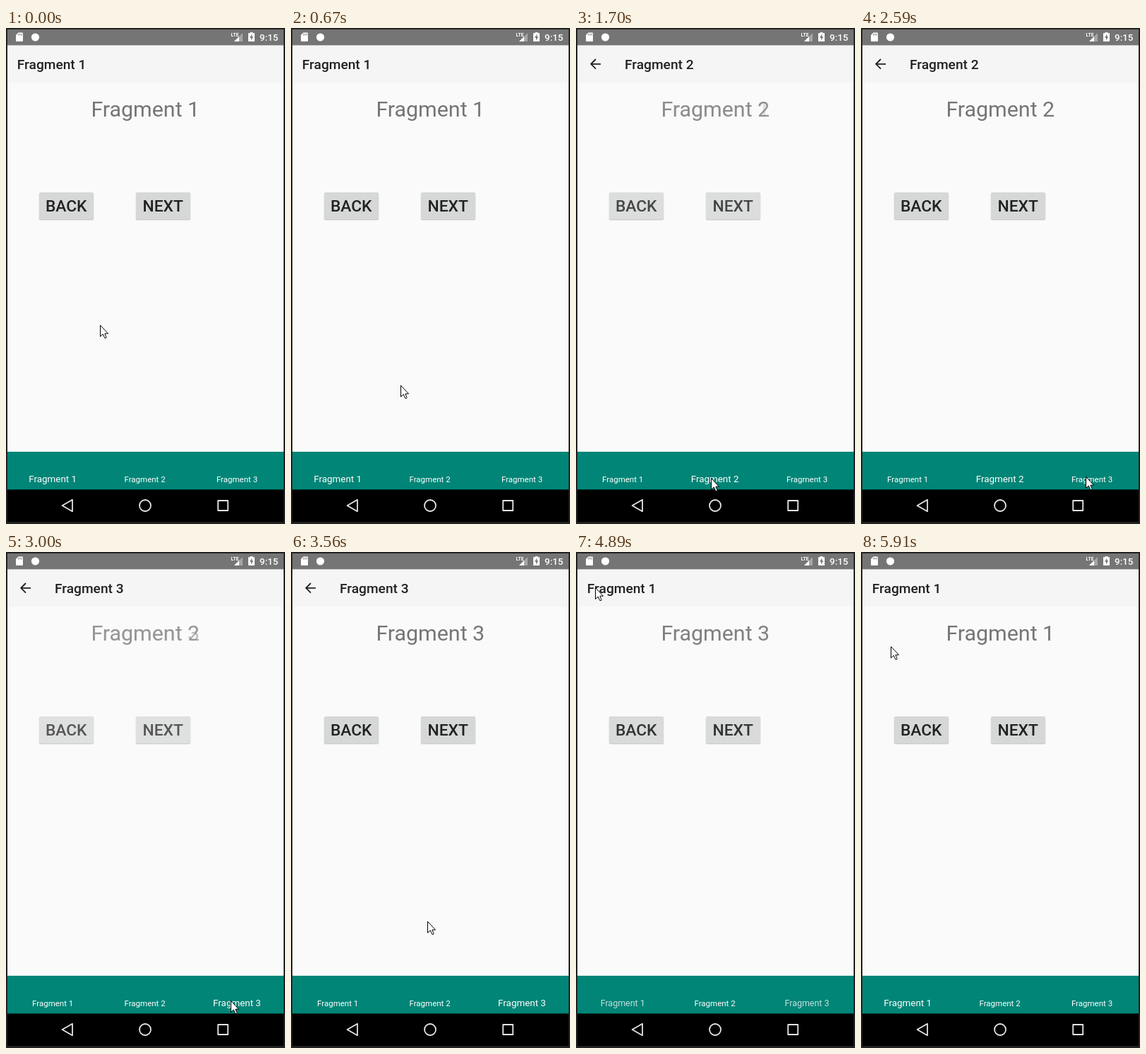
These frames come from a looping animation (395x700 px, 6.52 s). An HTML page:

```html
<!DOCTYPE html>
<html lang="en">
<head>
<meta charset="utf-8">
<title>Fragment navigation</title>
<style>
  html, body { margin: 0; width: 100%; height: 100%; overflow: hidden; background: #222; }
  svg { display: block; width: 100%; height: 100%; font-family: Roboto, sans-serif; }
  .mid { text-anchor: middle; }
  .medium { font-weight: 500; fill: #212121; }
  .heading { font-size: 30.4px; fill: #757575; }
</style>
</head>
<body>
<svg viewBox="0 0 395 700">
  <defs>
    <g id="buttons" class="mid medium" font-size="22.8">
      <g id="button">
        <rect x="46.5" y="232.5" width="78" height="39" rx="2.5" opacity=".1"/>
        <rect x="47" y="233" width="77" height="38" rx="2" opacity=".12"/>
        <rect x="47" y="232" width="77" height="38" rx="2" fill="#d6d7d7"/>
      </g>
      <use href="#button" x="137"/>
      <text x="85.2" y="259">BACK</text>
      <text x="222.2" y="259">NEXT</text>
    </g>
  </defs>

  <rect width="395" height="700" fill="#222"/>
  <rect x="2" y="24" width="391" height="575" fill="#fafafa"/>
  <rect x="2" y="24" width="391" height="53" fill="#f5f5f5"/>
  <rect x="2" y="2" width="391" height="22.4" fill="#757575"/>
  <rect x="2" y="595" width="391" height="3" fill="#fff"/>
  <rect x="2" y="598" width="391" height="54" fill="#008577"/>
  <rect x="2" y="651.4" width="391" height="45.6"/>

  <!-- status bar -->
  <g fill="#fff">
    <path d="M17.5 6.5H23a1 1 0 0 1 1 1V18a1 1 0 0 1-1 1H15a1 1 0 0 1-1-1V10Z"/>
    <path d="M17.8 8v2.5M20 8v2.5M22.2 8v2.5" stroke="#757575"/>
    <circle cx="41.5" cy="13" r="5.6"/>
    <text x="318.5" y="12" font-size="6.8" font-weight="700">LTE</text>
    <path d="M335 7V19H323Z" opacity=".35"/>
    <path d="M330 12V19H323Z"/>
    <path d="M345.7 7.2V6h3.6v1.2H352V19H343V7.2Z"/>
    <path d="M348.3 8.5L345 13.8H347V17.5L350.2 12.2H348.3Z" fill="#757575"/>
    <text x="385.3" y="18" font-size="13.3" font-weight="500" text-anchor="end">9:15</text>
  </g>

  <!-- action bar -->
  <g id="arrow">
    <circle id="ripple" cx="27.5" cy="51" opacity=".1"/>
    <path d="M35 50.8H21.3M28 44L21.2 50.8L28 57.6" fill="none" stroke="#212121" stroke-width="1.8"/>
  </g>
  <text id="title" class="medium" y="58" font-size="19.15"></text>

  <g id="oldPage"><text class="mid heading" x="197.3" y="125"></text><use href="#buttons"/></g>
  <g id="newPage"><text class="mid heading" x="197.3" y="125"></text><use href="#buttons"/></g>

  <g class="mid" fill="#fff">
    <text class="tab" y="641"></text>
    <text class="tab" y="641"></text>
    <text class="tab" y="641"></text>
  </g>

  <!-- system keys -->
  <g fill="none" stroke="#e4e4e4" stroke-width="1.8" stroke-linejoin="round">
    <path d="M79.6 674L94 665.8V682.2Z"/>
    <circle cx="197" cy="674" r="8"/>
    <rect x="300.2" y="667" width="14" height="14"/>
  </g>

  <path id="cursor" d="M.5.5V16.5L4.2 13L6.8 18.5H8.7L9 17.5L6.9 12.2H11.5Z" fill="#fff" stroke="#000"/>
</svg>
<script>
const LOOP = 6520;
const TAB_TIME = 120, FADE_DELAY = 45, FADE_TIME = 330;
const TAPS = [1480, 2870, 4830]; // each one opens the next of three pages
const HOME = [133, 419];
// pointer moves: start, end, new place, and how much x runs ahead of y
const MOVES = [
  { start: 410, end: 1050, to: [187, 628] },
  { start: 1180, end: 1230, to: [191, 635] },
  { start: 1830, end: 2490, to: [305, 621] },
  { start: 2490, end: 2590, to: [318, 633] },
  { start: 3427, end: 4100, to: [31, 73], lead: 2.58 },
  { start: 4130, end: 4250, to: [27, 50] },
  { start: 5480, end: 5910, to: [42, 133] }
];

const $ = id => document.getElementById(id);
const tabs = document.querySelectorAll('.tab');
const progress = (t, start, length) => Math.max(0, Math.min(1, (t - start) / length));
const easeOut = (k, power) => 1 - (1 - k) ** power;
const name = n => 'Fragment ' + n;

tabs.forEach((tab, i) => {
  tab.textContent = name(i + 1);
  tab.setAttribute('x', 66.2 + 130.4 * i);
});

function pointer(t) {
  let [x, y] = HOME;
  for (const { start, end, to, lead = 1 } of MOVES) {
    const k = progress(t, start, end - start);
    x += (to[0] - x) * easeOut(k, lead);
    y += (to[1] - y) * k;
  }
  return [Math.round(x), Math.round(y)];
}

function showPage(page, n, opacity) {
  page.firstChild.textContent = name(n);
  page.setAttribute('opacity', opacity);
}

function draw(t) {
  const taps = TAPS.filter(tap => tap <= t);
  const start = taps.length ? taps[taps.length - 1] : -LOOP;
  const to = taps.length % 3 + 1;
  const from = (taps.length + 2) % 3 + 1;

  $('title').textContent = name(to);
  $('title').setAttribute('x', to === 1 ? 15.8 : 69);
  $('arrow').style.display = to === 1 ? 'none' : '';
  $('ripple').setAttribute('r', 14 * progress(t, TAPS[2] - 140, 100));

  const fade = easeOut(progress(t, start + FADE_DELAY, FADE_TIME), 2);
  showPage($('oldPage'), from, 1 - fade);
  showPage($('newPage'), to, fade);

  const p = progress(t, start, TAB_TIME);
  tabs.forEach((tab, i) => {
    const active = i + 1 === to ? p : i + 1 === from ? 1 - p : 0;
    tab.setAttribute('font-size', 11.5 + 1.9 * active);
    tab.setAttribute('opacity', 1 - active * (1 - active));
  });

  $('cursor').setAttribute('transform', `translate(${pointer(t)})`);
}

function frame(now) {
  draw(now % LOOP);
  requestAnimationFrame(frame);
}
draw(0);
requestAnimationFrame(frame);
</script>
</body>
</html>
```
